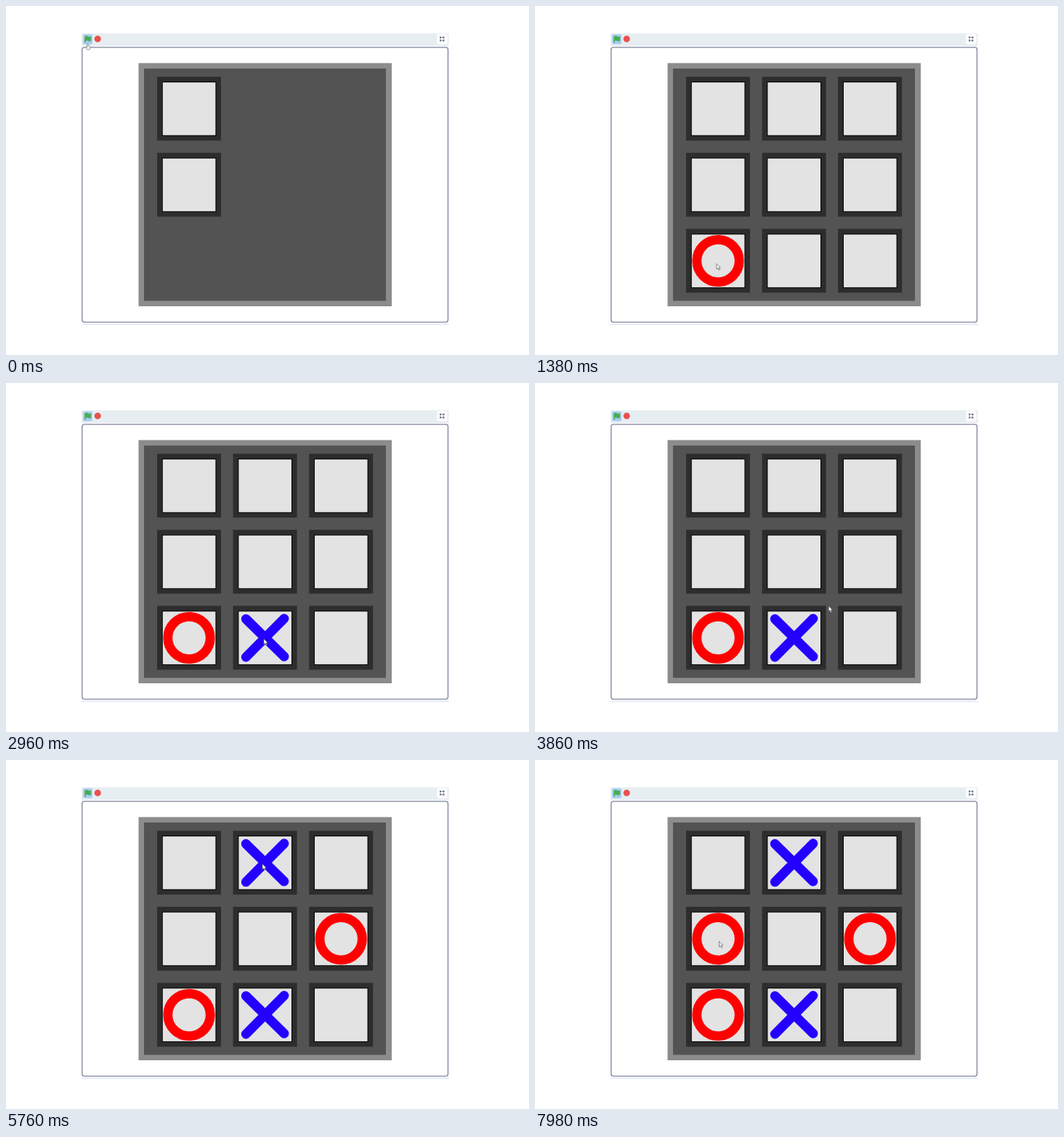
These frames come from a looping animation (720x480 px, 8 s). An HTML page:

```html
<!DOCTYPE html>
<html lang="en">
<head>
<meta charset="utf-8">
<title>Noughts and crosses</title>
<style>
  html, body { margin: 0; width: 100%; height: 100%; overflow: hidden; background: #fff; }
  svg { display: block; width: 720px; height: 480px; }
</style>
</head>
<body>
<svg viewBox="0 0 720 480" xmlns="http://www.w3.org/2000/svg">
  <rect width="720" height="480" fill="#fff"/>

  <!-- toolbar -->
  <rect x="104" y="37.5" width="505.5" height="17.5" fill="#e7eef2"/>
  <rect x="106" y="39" width="13" height="13.5" rx="2" fill="#a9cdee"/>
  <path d="M108.7 42.2c1.5-1.6 3.2-.9 4.2-.2 1.2.8 2.5.8 3.8.1v5.6c-1.5.8-2.9.6-4-.1-1.2-.7-2.2-.6-3.3.3v2.4h-.7z" fill="#45b04e" stroke="#3d9a4a" stroke-width=".5"/>
  <circle cx="126.2" cy="45.3" r="4.5" fill="#e9524f"/>
  <rect x="593.5" y="38.5" width="14" height="14" rx="2" fill="#fff"/>
  <path d="M597 42l2 2m0-1.9v1.9h-1.9M603.6 42l-2 2m0-1.9v1.9h1.9M597 48.8l2-2m0 1.9v-1.9h-1.9M603.6 48.8l-2-2m0 1.9v-1.9h1.9" fill="none" stroke="#4b5068" stroke-width="1"/>

  <!-- stage and board -->
  <rect x="104.8" y="56.8" width="503.7" height="378" rx="3" fill="#fff" stroke="#7d8399" stroke-width="1.3"/>
  <rect x="104" y="437" width="505.5" height="1.6" fill="#e2e8f7"/>
  <rect x="182.5" y="78.5" width="348.5" height="334.5" fill="#8c8c8c"/>
  <rect x="190" y="86" width="333" height="319.5" fill="#535353"/>
  <g id="cells"></g>
  <g id="marks"></g>

  <g id="cursor">
    <path id="arrow" d="M0 0v7.4l1.7-1.5 1.2 2.7 1.4-.6-1.2-2.6h2.3z" fill="#fff" stroke="#555" stroke-width=".7" stroke-linejoin="round"/>
    <path id="hand" d="M-.8.6c0-1 1.5-1 1.5 0v2.2l2 .5c.7.2.9.6.8 1.2l-.5 2.4-.6 1.1h-3L-2.8 5c-.5-.8.3-1.4 1-.8l1 .8z" fill="#fff" stroke="#666" stroke-width=".7" stroke-linejoin="round"/>
  </g>
</svg>
<script>
const LOOP = 8000, PITCH = 104.6;
const $ = id => document.getElementById(id);

function add(parent, tag, attrs) {
  const el = document.createElementNS("http://www.w3.org/2000/svg", tag);
  for (const k in attrs) el.setAttribute(k, attrs[k]);
  return parent.appendChild(el);
}

// Cells fill column by column.
const cells = [];
for (let col = 0; col < 3; col++) {
  for (let row = 0; row < 3; row++) {
    const x = 208 + col * PITCH, y = 97.3 + row * PITCH;
    const g = add($("cells"), "g", { transform: `translate(${x} ${y})` });
    add(g, "rect", { width: 88, height: 87.8, fill: "#2d2d2d" });
    add(g, "rect", { x: 6.7, y: 6.7, width: 74.8, height: 74.8, fill: "#050505" });
    add(g, "rect", { x: 7.8, y: 7.8, width: 72.6, height: 72.6, fill: "#e3e3e3" });
    cells.push(g);
  }
}

const moves = [
  { at: 1300, kind: "O", col: 0, row: 2 },
  { at: 2600, kind: "X", col: 1, row: 2 },
  { at: 4280, kind: "O", col: 2, row: 1 },
  { at: 5720, kind: "X", col: 1, row: 0 },
  { at: 7160, kind: "O", col: 0, row: 1 }
];
for (const m of moves) {
  const x = 252 + m.col * PITCH, y = 141.3 + m.row * PITCH;
  const common = { transform: `translate(${x} ${y})`, fill: "none", "stroke-linecap": "round" };
  m.el = m.kind === "O"
    ? add($("marks"), "circle", { ...common, r: 29.2, stroke: "#f00", "stroke-width": 12.8 })
    : add($("marks"), "path", { ...common, d: "M-26.3-26L26.3 25.7M26.3-26.5L-26.3 26.5", stroke: "#2400ff", "stroke-width": 13 });
}

// Cursor tip: time, x, y
const path = [
  [0, 112.5, 52], [320, 112.5, 52], [820, 247, 350], [980, 251, 362],
  [1180, 251, 362], [1300, 250, 354.5], [1680, 250, 354.5],
  [2000, 349.7, 316], [2140, 355, 352], [3740, 355, 352],
  [3860, 404, 307], [4220, 460, 249], [4990, 460, 249],
  [5560, 353, 143], [6480, 353, 143], [7080, 253.5, 249.5], [8000, 253.5, 249.5]
];

// Zero speed at rests, average slope when passing through.
function slope(i, k) {
  const a = path[i - 1], b = path[i], c = path[i + 1];
  if (!a || !c) return 0;
  const before = b[k] - a[k], after = c[k] - b[k];
  return before * after <= 0 ? 0 : (c[k] - a[k]) / (c[0] - a[0]);
}

function cursorAt(t) {
  let i = 0;
  while (i < path.length - 2 && t >= path[i + 1][0]) i++;
  const a = path[i], b = path[i + 1], d = b[0] - a[0], u = (t - a[0]) / d;
  const s = u * u * (3 - 2 * u);
  return [1, 2].map(k =>
    a[k] + (b[k] - a[k]) * s +
    d * u * (1 - u) * ((1 - u) * slope(i, k) - u * slope(i + 1, k)));
}

const show = (el, on) => el.setAttribute("visibility", on ? "visible" : "hidden");

function draw(t) {
  const count = t < 20 ? 2 : 3 + Math.floor((t - 20) / 30);
  cells.forEach((c, i) => show(c, i < count));
  moves.forEach(m => show(m.el, t >= m.at));
  const [x, y] = cursorAt(t);
  $("cursor").setAttribute("transform", `translate(${x.toFixed(2)} ${y.toFixed(2)})`);
  const onFlag = x < 119 && y < 56;
  show($("hand"), onFlag);
  show($("arrow"), !onFlag);
}

const start = performance.now();
function tick() {
  draw((performance.now() - start) % LOOP);
  requestAnimationFrame(tick);
}
draw(0);
requestAnimationFrame(tick);
</script>
</body>
</html>
```
